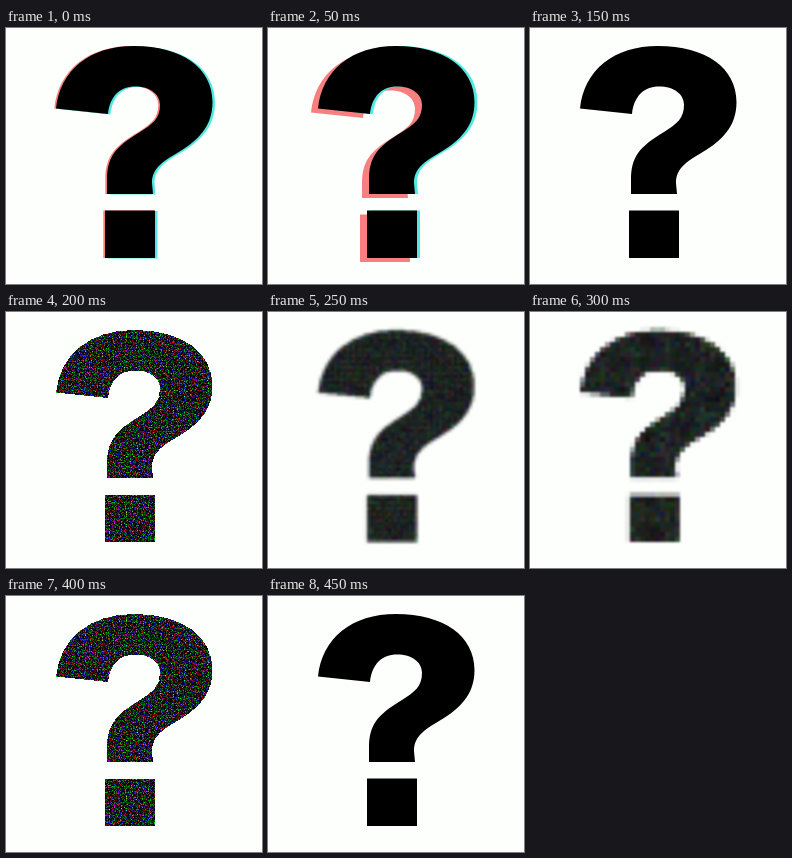
An HTML page without scripts that plays this animation: 256 by 256 pixels, repeating every 1350 ms.

```html
<!DOCTYPE html>
<html lang="en">
<head>
<meta charset="utf-8">
<title>Glitching question mark</title>
<style>
  html, body { margin: 0; width: 100%; height: 100%; overflow: hidden; background: #fdfffd; }
  svg { display: block; width: 100%; height: 100%; }

  /* Each pose flashes for one 50 ms tick; --i is its tick in the loop. */
  .pose {
    visibility: hidden;
    animation: flash 1350ms step-end infinite;
    animation-delay: calc(var(--i) * 50ms - 1350ms);
  }
  .rest { animation-name: rest; }
  @keyframes flash {
    0% { visibility: visible; }
    3.7037%, 100% { visibility: hidden; }
  }
  @keyframes rest {
    0% { visibility: visible; }
    66.6666%, 100% { visibility: hidden; }
  }
</style>
</head>
<body>
<svg viewBox="0 0 256 256" role="img" aria-label="Question mark">
  <defs>
    <path id="mark" d="M50 80.5C54 42 84 18 128 18C176 18 206.500 40 206.500 74
      C206.500 96 195 110 176 122C158 133 146 139 146 155L147 166H101V152
      C101 129 109 119 134 104C147 96 154 90 154 77C154 66 144 58.500 129 58.500
      C114 58.500 104 68 102 86ZM99 182.500H149V230H99Z"/>

    <g id="fringe">
      <use href="#mark" x="-1.700" fill="#f77f7f"/>
      <use href="#mark" x="2.500" y=".5" fill="#4fe9e0"/>
      <use href="#mark"/>
    </g>
    <g id="wide">
      <use href="#mark" x="-7" y="4" fill="#f77f7f"/>
      <use href="#mark" x="3" fill="#4fe9e0"/>
      <use href="#mark"/>
    </g>

    <filter id="noise" filterUnits="userSpaceOnUse" x="0" y="0" width="256" height="256"
            color-interpolation-filters="sRGB">
      <feTurbulence type="fractalNoise" baseFrequency=".83" numOctaves="2" seed="7"/>
      <feColorMatrix values="3 0 0 0 -1.55  0 3 0 0 -1.51  0 0 3 0 -1.52  0 0 0 0 1"/>
      <feComposite in2="SourceAlpha" operator="in"/>
    </filter>

    <!-- Mosaic: sample one pixel per cell, grow it to fill the cell, soften. -->
    <filter id="soften" filterUnits="userSpaceOnUse" x="0" y="0" width="256" height="256"
            color-interpolation-filters="sRGB">
      <feGaussianBlur in="SourceGraphic" stdDeviation="1" result="src"/>
      <feFlood x="1" y="1" width="1" height="1"/>
      <feComposite in2="SourceGraphic" operator="over" x="0" y="0" width="3" height="3"/>
      <feTile/>
      <feComposite in="src" operator="in"/>
      <feMorphology operator="dilate" radius="1"/>
      <feGaussianBlur stdDeviation=".8"/>
    </filter>
    <filter id="coarsen" filterUnits="userSpaceOnUse" x="0" y="0" width="256" height="256"
            color-interpolation-filters="sRGB">
      <feGaussianBlur in="SourceGraphic" stdDeviation="1" result="src"/>
      <feFlood x="2" y="2" width="1" height="1"/>
      <feComposite in2="SourceGraphic" operator="over" x="0" y="0" width="5" height="5"/>
      <feTile/>
      <feComposite in="src" operator="in"/>
      <feMorphology operator="dilate" radius="2"/>
      <feGaussianBlur stdDeviation="1.2"/>
    </filter>

    <use id="grain" href="#mark" filter="url(#noise)" shape-rendering="crispEdges"/>
    <g id="soft" filter="url(#soften)"><use href="#grain"/></g>
    <g id="coarse" filter="url(#coarsen)"><use href="#grain"/></g>
  </defs>

  <use class="pose" style="--i:0" href="#fringe"/>
  <use class="pose" style="--i:1" href="#wide"/>
  <use class="pose" style="--i:2" href="#fringe"/>
  <use class="pose" style="--i:3" href="#mark"/>
  <use class="pose" style="--i:4" href="#grain"/>
  <use class="pose" style="--i:5" href="#soft"/>
  <use class="pose" style="--i:6" href="#coarse"/>
  <use class="pose" style="--i:7" href="#soft"/>
  <use class="pose" style="--i:8" href="#grain"/>
  <use class="pose rest" style="--i:9" href="#mark"/>
</svg>
</body>
</html>
```
